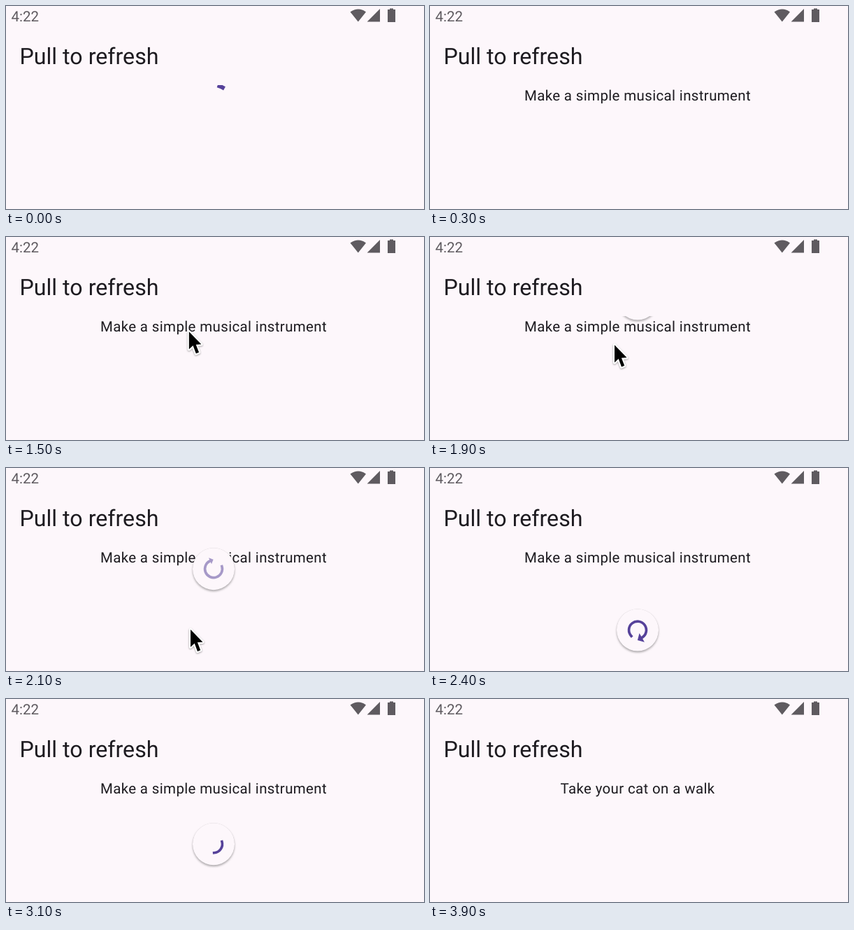
Recreate the animation shown at these times as an HTML page. Size 598x290 px, loop 4.4 s.

```html
<!DOCTYPE html>
<html lang="en">
<head>
<meta charset="utf-8">
<title>Pull to refresh</title>
<style>
  html, body { margin: 0; height: 100%; overflow: hidden; background: #fdf7fb; }
  svg { display: block; width: 598px; height: 290px; font-family: Roboto, sans-serif; text-rendering: geometricPrecision; }
  .status { fill: #5f5b60; }
  .ink { fill: #1d1b20; }
  .arc { fill: none; stroke: #56429a; stroke-linecap: square; }
  #disc { fill: #fdf7fb; filter: drop-shadow(0 2px 1.6px rgba(0, 0, 0, .27)) drop-shadow(0 0 .6px rgba(0, 0, 0, .2)); }
  #cursor { filter: drop-shadow(0 1px 1.2px rgba(0, 0, 0, .35)); }
</style>
</head>
<body>
<svg viewBox="0 0 598 290">
  <clipPath id="page"><rect y="113" width="598" height="177"/></clipPath>
  <g class="status">
    <text x="7.5" y="21.6" font-size="20.5">4:22</text>
    <path d="M492.5 8.6Q504 .4 515 8.6L503.8 22.4ZM535 4V22.4H516.6ZM549 5V3.4H554V5H557V23H546V5Z"/>
  </g>
  <text class="ink" x="19.4" y="83" font-size="32.2">Pull to refresh</text>
  <g clip-path="url(#page)">
    <text id="task" class="ink" x="297" y="134.7" font-size="20.48" letter-spacing=".366" text-anchor="middle"></text>
    <path id="loader" class="arc" transform="translate(297 139.4)" stroke-width="5.85"/>
    <g id="dial">
      <circle id="disc" r="30"/>
      <g id="hand">
        <path id="ring" class="arc" stroke-width="3.66"/>
        <path id="head" fill="#56429a"/>
      </g>
    </g>
  </g>
  <path id="cursor" d="M0 0V25L5.7 19.7L10 31.2L14.2 29.5L9.9 18.4L17.5 18Z"
    stroke="#fff" stroke-width="4.4" stroke-linejoin="round" paint-order="stroke"/>
</svg>
<script>
const LOOP = 4400, STEP = 100;
const SNAP = 2664, REFRESH = 2814, DONE = 3170;
const RING = 12.44, LOADER = 26.35;
const $ = id => document.getElementById(id);
const clamp = x => Math.min(1, Math.max(0, x));
const span = (t, a, b) => clamp((t - a) / (b - a));
const set = (id, attrs) => { for (const k in attrs) $(id).setAttribute(k, attrs[k]); };
const show = (id, on) => set(id, { visibility: on ? "visible" : "hidden" });

// cubic-bezier(.4, 0, .2, 1)
function ease(x) {
  let lo = 0, hi = 1, m;
  for (let i = 0; i < 24; i++) {
    m = (lo + hi) / 2;
    const bx = 1.2 * m * (1 - m) ** 2 + .6 * m * m * (1 - m) + m ** 3;
    if (bx < x) lo = m; else hi = m;
  }
  return m * m * (3 - 2 * m);
}

// Angles in degrees, clockwise from the top
function point(r, deg) {
  const a = deg * Math.PI / 180;
  return [r * Math.sin(a), -r * Math.cos(a)];
}

function arc(r, start, sweep) {
  return `M${point(r, start)}A${r} ${r} 0 ${+(sweep > 180)} 1 ${point(r, start + sweep)}`;
}

// Indeterminate spinner: the head runs ahead, then the tail catches up
function spin(ms, stretch = 1) {
  const p = ms % 1333 / 1333;
  const tail = 270 * ease(clamp(2 * p - 1));
  const sweep = 270 * stretch * ease(clamp(2 * p)) - tail;
  return [tail + ms * 360 / 2222 + 90 * p, Math.max(sweep, .1)];
}

function drag(t) {
  const u = span(t, 1800, 2500);
  return (u + u * u * (3 - 2 * u)) / 2;
}

function drawDial(t) {
  const on = t >= 1900 && t < DONE + 200;
  $("dial").style.display = on ? "" : "none";
  if (!on) return;
  let pull = 1.3704 * drag(t) - .0484;
  pull += (1 - pull) * span(t, SNAP, REFRESH);
  const value = pull / 2;
  const turn = value < .33 ? -.1 - .1 * value / .33 : -.2 + 1.55 * (value - .33) / .67;
  const wound = span(value, .1, .33);
  const [start, sweep] = spin(666 * wound + Math.max(0, t - REFRESH), 1.05);
  set("dial", { transform: `translate(297 ${77.1 + 130.2 * pull}) scale(${1 - span(t, DONE, DONE + 200)})` });
  set("hand", { transform: `rotate(${turn * 180})`, opacity: clamp(pull) });
  set("ring", { d: arc(RING, start, sweep) });

  const size = t < REFRESH ? 7.32 * wound : 0, end = start + sweep;
  const tip = point(RING, end), ahead = point(size, end + 90);
  set("head", { d: `M${point(RING - size, end)}L${point(RING + size, end)}L${tip[0] + ahead[0]} ${tip[1] + ahead[1]}Z` });
}

function drawCursor(t) {
  const away = (1 - span(t, 700, 1000)) ** 1.5, lift = span(t, 1300, 1600);
  show("cursor", t >= 700 && t < 2400);
  set("cursor", { transform: `translate(${257.5 + 54.5 * away + 6.5 * lift} ${146 - 119 * away - 16 * lift + 245 * drag(t)})` });
}

function draw(now) {
  const t = Math.floor(now % LOOP / STEP) * STEP;
  const loading = t < 300;
  $("task").textContent = loading ? "" : t < 3200 ? "Make a simple musical instrument" : "Take your cat on a walk";
  show("loader", loading);
  if (loading) set("loader", { d: arc(LOADER, ...spin(t + 81)) });
  drawDial(t);
  drawCursor(t);
}

let begin;
function tick(now) {
  begin ??= now;
  draw(now - begin);
  requestAnimationFrame(tick);
}
draw(0);
requestAnimationFrame(tick);
</script>
</body>
</html>
```
